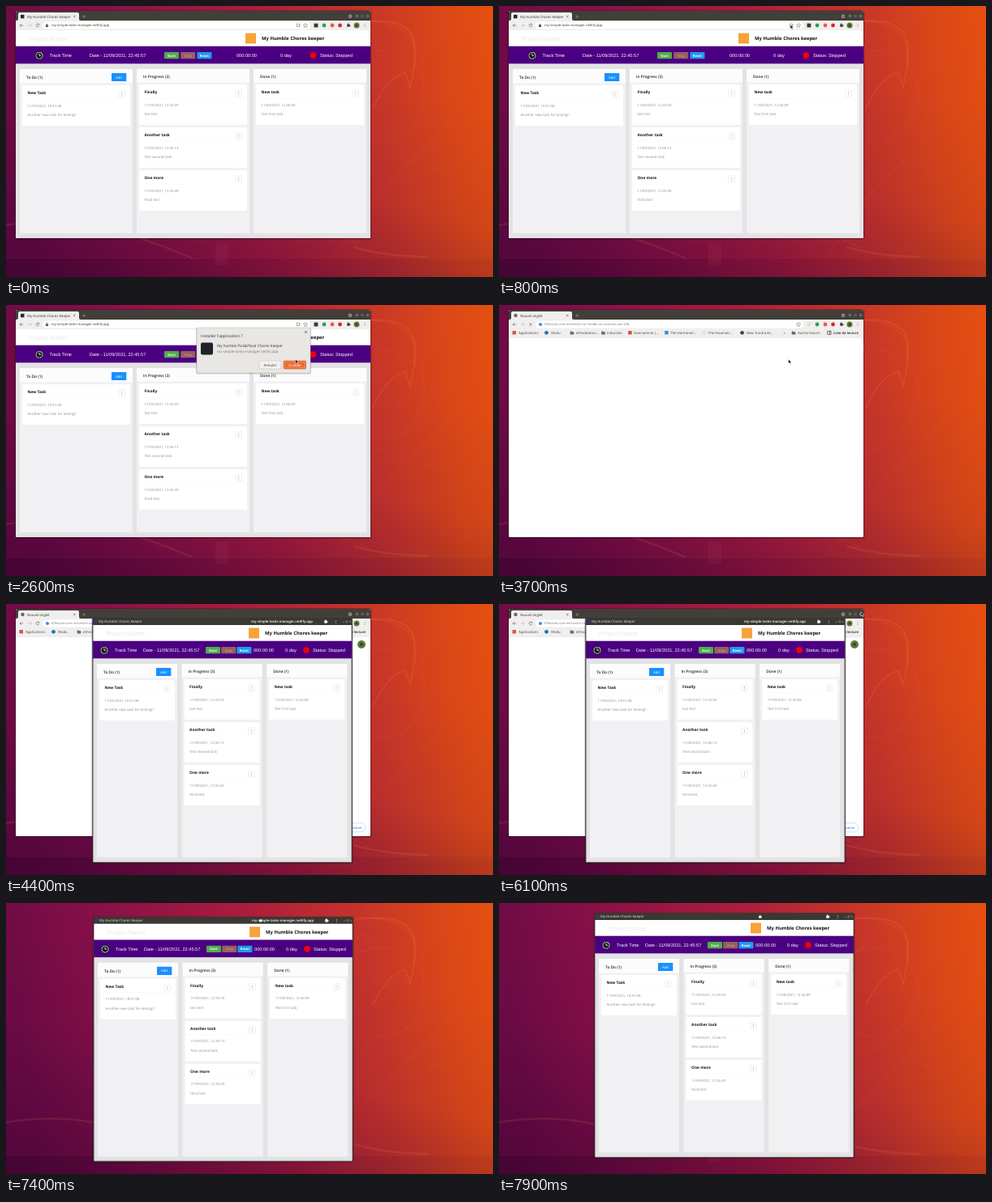
Write an HTML page that moves like this. It is 600 px wide and 335 px high and loops after 8000 ms.

```html
<!DOCTYPE html>
<html lang="en">
<head>
<meta charset="utf-8">
<title>Task board</title>
<style>
html, body { margin: 0; width: 100%; height: 100%; overflow: hidden; background: #8a1742; }
svg { display: block; width: 100vw; height: 100vh; }
text { font-family: "Open Sans", "Noto Sans", sans-serif; white-space: pre; text-rendering: geometricPrecision; }
.arial { font-family: "Liberation Sans", Arial, sans-serif; }
</style>
</head>
<body>
<svg id="stage" viewBox="0 0 600 335" xmlns="http://www.w3.org/2000/svg"></svg>
<script>
const LOOP = 8000, STEP = 100;
const APP = 'My Humble Chores Keeper';
const HOST = 'my-simple-tasks-manager.netlify.app';

const attrs = o => Object.entries(o).map(([k, v]) => ` ${k}="${v}"`).join('');
const rect = (x, y, width, height, fill, more = {}) => `<rect${attrs({ x, y, width, height, fill, ...more })}/>`;
const circle = (cx, cy, r, fill, more = {}) => `<circle${attrs({ cx, cy, r, fill, ...more })}/>`;
const line = (d, stroke, width = 0.6, more = {}) =>
  `<path${attrs({ d, stroke, 'stroke-width': width, fill: 'none', ...more })}/>`;
const shape = (d, fill, more = {}) => `<path${attrs({ d, fill, ...more })}/>`;
const group = (id, ...parts) => `<g id="${id}">${parts.join('')}</g>`;
// y is the middle of the line
const text = (x, y, size, str, fill = '#333', more = {}) =>
  `<text${attrs({ x, y: y + size * 0.36, 'font-size': size, fill, ...more })}>${str.replace(/&/g, '&amp;')}</text>`;
const bold = { 'font-weight': 700 }, semi = { 'font-weight': 600 };
const mid = { 'text-anchor': 'middle' }, arial = { class: 'arial' };

const dots = (x, y, fill) => [-1.4, 0, 1.4].map(d => circle(x, y + d, 0.45, fill)).join('');
const cross = (x, y, r, color, width = 0.6) =>
  line(`M${x - r} ${y - r}l${2 * r} ${2 * r}m0 ${-2 * r}l${-2 * r} ${2 * r}`, color, width);
const puzzle = (x, y, fill) => rect(x - 1.8, y - 1, 3.2, 3.2, fill) + circle(x - 0.3, y - 1.2, 0.9, fill) + circle(x + 1.6, y + 0.6, 0.9, fill);
const folder = (x, y) => shape(`M${x - 2.3} ${y - 1.8}h1.9l.7.7h2v3.2h-4.6z`, '#6a6a6a');
const reload = x => line(`M${x + 1.6} 22.8a1.9 1.9 0 1 0 .2 1.9m-.1-2.7v1.3h-1.3`, '#555');

function gradient(id, stops, box) {
  return `<linearGradient${attrs({ id, ...box })}>` + stops.map(([offset, color, opacity = 1]) =>
    `<stop${attrs({ offset, 'stop-color': color, 'stop-opacity': opacity })}/>`).join('') + '</linearGradient>';
}

function wallpaper() {
  const faint = (d, width, opacity) => line(d, '#ff8a55', width, { opacity });
  const ring = (x, y, r, opacity) =>
    circle(x, y, r, 'none', { stroke: '#ff8a55', 'stroke-width': 0.6, opacity });
  return '<defs>' +
    gradient('wide', [[0, '#700b46'], [0.17, '#850f48'], [0.5, '#ab1d3d'], [0.73, '#c5342a'], [0.88, '#d94619'], [1, '#e5500f']],
      { x1: 0, y1: 0.08, x2: 1, y2: 0 }) +
    gradient('low', [[0, '#2b0030', 0], [0.45, '#2b0030', 0.06], [1, '#2b0030', 0.4]], { x1: 0.6, y1: 0.2, x2: 0.25, y2: 1.05 }) +
    gradient('floor', [[0, '#25001f', 0.3], [0.5, '#4a0030', 0.18], [1, '#6a0820', 0.06]], { x1: 0, y1: 0, x2: 1, y2: 0 }) +
    '</defs>' +
    rect(0, 0, 600, 335, 'url(#wide)') + rect(0, 0, 600, 335, 'url(#low)') +
    rect(0, 312, 600, 23, 'url(#floor)') +
    faint('M0 312H600', 0.5, 0.13) +
    faint('M0 271Q55 262 106 271Q170 285 230 312', 2.4, 0.12) +
    faint('M400 28Q480 6 500 35Q506 55 502 80L498 100L492 82Q470 88 452 126', 1.8, 0.16) +
    faint('M430 18Q486 16 504 45V74', 0.7, 0.25) +
    ring(440, 50, 10, 0.22) + ring(462, 110, 55, 0.16) + ring(420, 95, 95, 0.1) +
    faint('M420 160Q480 190 545 205T600 240', 0.5, 0.13) +
    faint('M440 250L560 130M400 312L420 288L448 300', 0.8, 0.12) +
    faint('M428 298Q470 310 520 310', 2.4, 0.13) +
    rect(258, 293, 16, 27, '#d35a78', { opacity: 0.08 });
}

const cards = [
  [['New Task', '11/09/2021, 18:51:08', 'Another new task for testing!!']],
  [['Finally', '11/09/2021, 12:33:59', 'last test'],
   ['Another task', '11/09/2021, 12:36:13', 'Test second task'],
   ['One more', '11/09/2021, 12:35:49', 'third test']],
  [['New task', '11/09/2021, 12:36:09', 'Test first task']]
];

function column(i, x, y, w, h) {
  const top = i ? 0 : 1;
  let out = rect(x, y, w, h, '#f1f0f2') + rect(x, y, w, 16.5 + top, '#fcfcfd') +
    text(x + 8, y + 9 + top, 4.8, ['To Do (1)', 'In Progress (3)', 'Done (1)'][i], '#222', semi);
  if (!i) out += rect(x + w - 26, y + 4.9, 18.3, 10.2, '#1890ff', { rx: 0.4 }) +
    text(x + w - 17, y + 10, 4.3, 'Add', '#fff', mid);
  cards[i].forEach(([name, date, note], n) => {
    const cy = y + 19 + top + n * 53;
    out += rect(x + 3, cy, w - 6, 50, '#fff', { rx: 0.8 }) +
      line(`M${x + 3} ${cy + 17}h${w - 6}`, '#f3f3f3', 0.4) +
      text(x + 9.5, cy + 9, 4.8, name, '#161616', bold) +
      text(x + 9.5, cy + 25, 4.3, date, '#8c8c8c') +
      text(x + 9.5, cy + 36.2, 4.4, note, '#8c8c8c') +
      rect(x + w - 17, cy + 7, 7.5, 7.5, '#fff', { stroke: '#dcdcdc', 'stroke-width': 0.5, rx: 0.5 }) +
      dots(x + w - 13.2, cy + 10.8, '#777');
  });
  return out;
}

function clock(x, y) {
  return circle(x, y, 5.4, '#1c1526') + circle(x, y, 4, 'none', { stroke: '#fff', 'stroke-width': 1.1, 'stroke-dasharray': '1.2 .8' }) +
    line(`M${x} ${y - 2.4}V${y}h2`, '#fff', 0.8) + rect(x - 1.2, y - 6.4, 2.4, 1.3, '#1c1526');
}

// at: name, logo, clock, track, date, buttons, pitch, hours, days, lamp, status
function board(x, y, w, h, at, colW, pitch) {
  const [name, logo, clk, track, date, btn, gap, hours, days, lamp, status] = at;
  const label = (lx, str) => text(lx, y + 31, 5.6, str, '#fff', arial);
  let out = rect(x, y, w, h, '#e3e2e4') + rect(x, y, w, 20, '#fff') +
    text(name, y + 10.5, 7.6, 'Project Name', '#e6e6e9') +
    rect(logo, y + 3.5, 13, 13, '#f7a33a') +
    text(logo + 20, y + 10.3, 5.9, 'My Humble Chores keeper', '#151515', bold) +
    rect(x, y + 19.7, w, 21.6, '#4b0082') + clock(clk, y + 31.3) +
    label(track, 'Track Time') + label(date, 'Date - 11/09/2021, 22:45:57') +
    label(hours, '000:00:00') + label(days, '0 day') + label(status, 'Status: Stopped') +
    circle(lamp, y + 31, 3.8, '#f50000');
  [['Start', '#4fae4b', '#fff'], ['Stop', '#96605f', '#c58d83'], ['Reset', '#1e9af0', '#fff']].forEach(([str, bg, fg], i) => {
    const bx = btn + i * gap;
    out += rect(bx, y + 27, 18, 8.2, bg, { rx: 1 }) + text(bx + 9, y + 31.1, 4, str, fg, { ...mid, ...bold });
  });
  for (let i = 0; i < 3; i++) out += column(i, x + 5 + i * pitch, y + 48, colW, h - 54);
  return out;
}

function chrome() {
  let out = rect(10.8, 5.2, 439.4, 283.2, '#1c0a18', { opacity: 0.4, rx: 2 }) +
    rect(12, 6, 437, 281, '#fff', { rx: 1.5 }) +
    shape('M12 18V8q0-2 2-2H447q2 0 2 2V18z', '#423f3a') +
    shape('M13 18q2 0 2-2V10q0-2 2-2H88q2 0 2 2v6q0 2 2 2z', '#f0efed') +
    rect(12, 18, 437, 12, '#f0efed') + rect(45, 19.5, 330, 9, '#fff', { rx: 4.5 }) +
    cross(84.3, 13, 1.2, '#555') + line('M94.2 13h4m-2-2v4', '#aaa', 0.5) +
    circle(424, 12.8, 2.3, '#99958c') + shape('M422.8 12.2h2.4l-1.2 1.6z', '#423f3a');
  [432.5, 439, 445.5].forEach((x, i) => {
    out += circle(x, 12.5, 2.2, '#77736a', { stroke: '#2c2a26', 'stroke-width': 0.4 }) +
      (i < 2 ? line(i ? `M${x - 0.8} 11.7h1.6v1.6h-1.6z` : `M${x - 1} 12.8h2`, '#35322e', 0.5) : cross(x, 12.5, 0.8, '#35322e', 0.5));
  });
  return out +
    line('M21.3 24h-4.2m1.8-1.8l-1.8 1.8 1.8 1.8', '#555') +
    line('M27.2 24h4.2m-1.8-1.8l1.8 1.8-1.8 1.8', '#b5b5b5') +
    shape('M369 21.4l.8 1.7 1.9.2-1.4 1.3.4 1.9-1.7-1-1.7 1 .4-1.9-1.4-1.3 1.9-.2z', '#fff', { stroke: '#666', 'stroke-width': 0.5 }) +
    circle(392, 24, 2.4, '#2c9d63') + circle(402, 24, 2.4, '#ee5a4a') + circle(411.5, 24, 2.4, '#d6292d') +
    puzzle(422, 23.6, '#444') + circle(432, 24, 3.5, '#5d7c3b') + circle(432, 24, 1.5, '#34421f') + dots(442, 24, '#444');
}

function site() {
  return rect(18, 10.8, 4.5, 4.5, '#20264a') + text(26, 13, 4.3, APP, '#333') + reload(39) +
    shape('M48.9 23.6h3.2v2.4h-3.2zM49.5 23.6v-.8q1-1.6 2 0v.8h-.6v-.7q-.4-.5-.8 0v.7z', '#555') +
    text(56, 24, 4.15, HOST, '#333') +
    line('M360.5 22h-2.2v3.6h3.8v-1.4M361.5 21.8v2.2m-.9-.8l.9.9.9-.9', '#666', 0.55) +
    rect(379.5, 21.6, 4.8, 4.8, '#2e3a3a') +
    board(12, 30, 437, 257, [28, 295, 41, 53.5, 103, 195, 20.2, 284, 338, 378.3, 387], 139, 144);
}

function blankTab() {
  let out = circle(20.5, 13, 2.2, '#666') + text(26, 13, 4.3, 'Nouvel onglet') +
    circle(51, 24, 2, '#4285f4') +
    text(56, 24, 4, 'Effectuez une recherche sur Fandle ou saisissez une URL', '#777') +
    rect(379.5, 21.6, 4.8, 4.8, '#dededc') +
    rect(12, 30, 437, 10.5, '#f0efed') + line('M12 40.7H449', '#d9d8d6', 0.4) +
    rect(16.5, 32, 4.5, 4.5, '#d6564d') + circle(58.5, 34.3, 2.4, '#1676b5') +
    folder(90, 34.3) + folder(128.5, 34.3) + rect(159.2, 32, 4.4, 4.4, '#e0472f') +
    rect(204.2, 32, 4.4, 4.4, '#2792d8') + rect(250.5, 32, 3.8, 4.6, '#e2e0da') +
    circle(299.5, 34.3, 2.4, '#444') + folder(363, 34.3) +
    rect(404.8, 32.2, 4.2, 4, 'none', { stroke: '#444', 'stroke-width': 0.7 }) + line('M407.4 32v4.4', '#444', 0.7);
  [[24, 'Applications'], [64, 'Wodu'], [95, 'ethnobotani...'], [133, 'Induction'], [166, 'Oversomnia |...'],
   [211, 'The Harmonel...'], [257.5, 'The Haverwic...'], [305, 'New Tundra M...'], [350.5, '»'], [368, 'Autres favoris']]
    .forEach(([x, str]) => { out += text(x, 34.3, 4.3, str, '#444'); });
  return out + text(412, 34.3, 4.2, 'Liste de lecture', '#222', semi);
}

const newTabPage = () => reload(39) + circle(438, 50, 5, '#5d7c3b') + circle(438, 50, 2, '#34421f') +
  rect(396, 270.8, 47, 11, '#fff', { rx: 5.5, stroke: '#a9c8f2', 'stroke-width': 0.6 }) +
  text(439, 276.2, 4, 'Personnaliser', '#1a73e8', { 'text-anchor': 'end' });

function dialog() {
  return rect(234, 28, 142, 57.5, '#000', { opacity: 0.18, rx: 2 }) +
    rect(235, 28, 140, 56, '#e9e7e4', { rx: 1.5, stroke: '#b9b5af', 'stroke-width': 0.5 }) +
    text(240, 38, 5, "Installer l'application ?", '#333') + cross(369.5, 33.5, 1.5, '#444', 0.7) +
    rect(240, 46.5, 15, 15, '#20232a', { rx: 2 }) +
    text(260, 50, 4.6, 'My humble Pick&Place Chores Keeper', '#333') +
    text(260, 57.3, 4.4, HOST, '#777') +
    rect(312, 69, 27, 10, '#f4f2f0', { rx: 1.2, stroke: '#c0bbb4', 'stroke-width': 0.5 }) +
    text(325.5, 74, 4.4, 'Annuler', '#333', mid) +
    rect(342, 69, 27.5, 10, '#ee6a30', { rx: 1.2, stroke: '#c9531f', 'stroke-width': 0.5 }) +
    rect(343.3, 70.3, 24.9, 7.4, 'none', { stroke: '#ffd9c4', 'stroke-width': 0.5, 'stroke-dasharray': '1 .7' }) +
    text(355.8, 74, 4.4, 'Installer', '#fff', mid);
}

function appWindow() {
  return rect(105.6, 17, 321.8, 304, '#14040f', { opacity: 0.35, rx: 2 }) +
    rect(106.6, 17.6, 319.8, 302, '#3a3833', { rx: 1.5 }) +
    rect(108.2, 19.8, 4, 4, '#2b3a78') + text(114, 21.8, 4.3, APP, '#e8e6e1') +
    group('origin', text(302, 21.8, 4.25, HOST, '#fff', semi)) +
    puzzle(394, 21.5, '#fff') + dots(406.3, 21.8, '#fff') +
    line('M414.6 22.4h2.2M418.8 20.8h2v2h-2z', '#aaa69d', 0.5) + cross(424, 21.8, 1, '#aaa69d', 0.5) +
    board(107, 26, 319, 293.5, [123, 299, 121, 134, 169, 246, 19.2, 305, 344, 370, 378], 99, 104.6) +
    rect(107, 18, 319, 301.4, 'none', { stroke: '#3a3833', 'stroke-width': 0.8, rx: 1 });
}

document.getElementById('stage').innerHTML = wallpaper() +
  group('browser', chrome(), group('site', site()),
    group('blank', blankTab(), group('loading', cross(39, 24, 1.6, '#555')), group('ready', newTabPage()))) +
  group('dialog', dialog()) + group('app', appWindow()) +
  group('arrow', shape('M0 0V5.4L1.3 4.2L2.2 6.2L3.1 5.8L2.2 3.9H3.9z', '#111', { stroke: '#fff', 'stroke-width': 0.5 })) +
  group('hand', shape('M-2 2.2V.3L-1.2-.8L0-1.6L1.2-.8L2 .3V2.2z', '#fff', { stroke: '#222', 'stroke-width': 0.3 }));

const parts = {};
for (const g of document.querySelectorAll('g[id]')) parts[g.id] = g;
const show = (id, on) => parts[id].setAttribute('display', on ? 'inline' : 'none');
const move = (id, x, y) => parts[id].setAttribute('transform', `translate(${x.toFixed(2)} ${y.toFixed(2)})`);
const ease = p => p * p * (3 - 2 * p);

// pointer stops: time, x, y
const path = [
  [300, 372, 62], [800, 359, 23], [1100, 359, 23], [1600, 363, 42], [2300, 356.5, 67], [5200, 356.5, 67],
  [6000, 446, 9.5], [6400, 446, 9.5], [7100, 312, 21.5], [8000, 312, 21.5]
];

function along(t) {
  if (t <= path[0][0]) return path[0].slice(1);
  const i = path.findIndex(p => p[0] >= t);
  const [t0, x0, y0] = path[i - 1], [t1, x1, y1] = path[i];
  const k = ease((t - t0) / (t1 - t0));
  return [x0 + (x1 - x0) * k, y0 + (y1 - y0) * k];
}

function draw(ms) {
  const t = Math.floor(ms % LOOP / STEP) * STEP;
  const drag = Math.min(1, Math.max(0, (t - 7200) / 700));
  const dx = 11 * Math.pow(drag, 1.9), dy = -5 * Math.pow(drag, 2.6);
  const [x, y] = along(t);
  const grab = t >= 7200;

  show('browser', t < 6500);
  show('site', t < 3200);
  show('blank', t >= 3200);
  show('loading', t < 4000);
  show('ready', t >= 4000);
  show('dialog', t >= 1000 && t < 2800);
  show('app', t >= 4100);
  show('origin', t < 7700);
  show('arrow', (t >= 300 && t < 4100) || (t >= 5400 && !grab));
  show('hand', grab);
  move('app', dx, dy);
  move('arrow', x, y);
  move('hand', x + 1 + dx * 0.8, y + dy);
}

const begin = performance.now();
function tick() {
  draw(performance.now() - begin);
  requestAnimationFrame(tick);
}
draw(0);
requestAnimationFrame(tick);
</script>
</body>
</html>
```
